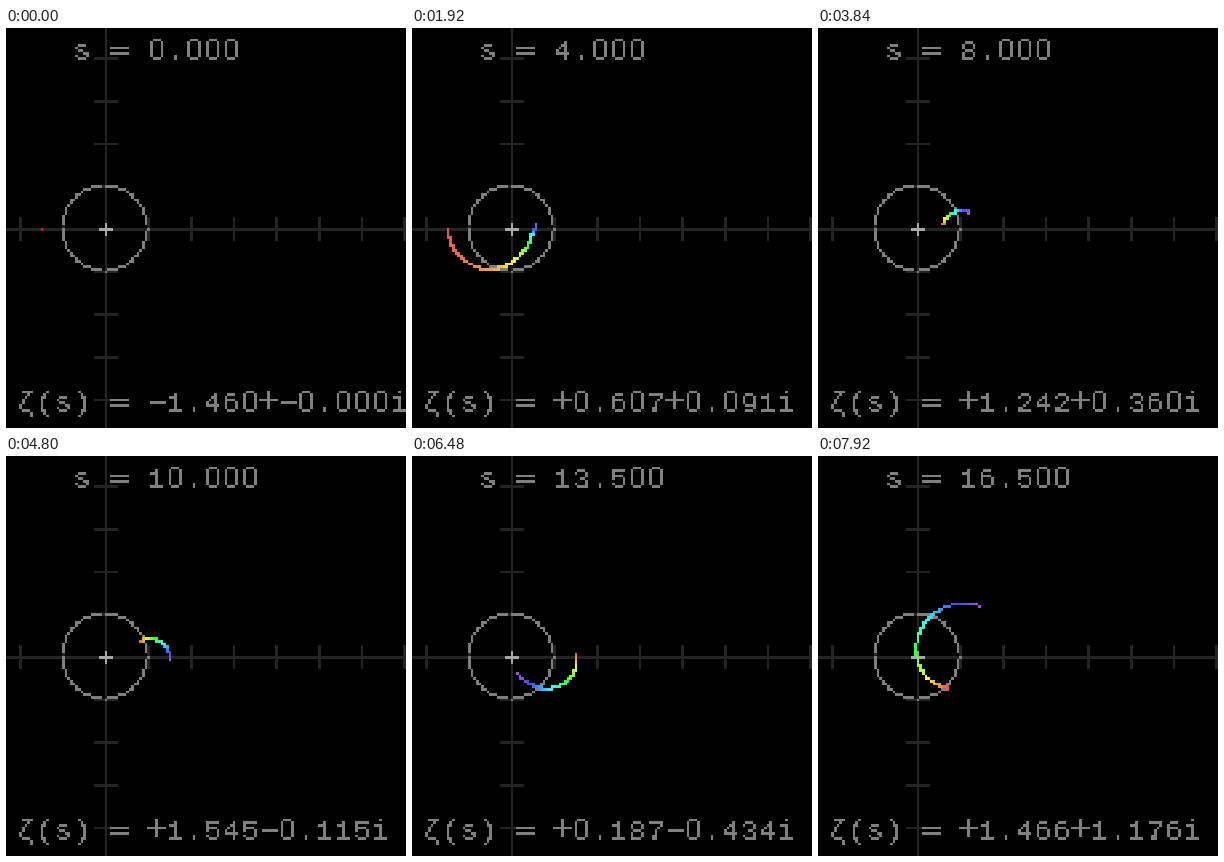
Animation of 400x400 px, one loop 8000 ms. Source, as an HTML page with a canvas:

```html
<!DOCTYPE html>
<html lang="en">
<head>
<meta charset="utf-8">
<title>Zeta on the critical line</title>
<style>
  html, body { margin: 0; width: 100%; height: 100%; overflow: hidden; background: #000; }
  canvas { display: block; width: 100vw; height: 100vh; image-rendering: pixelated; }
</style>
</head>
<body>
<canvas id="stage" width="150" height="150"></canvas>
<script>
const SIZE = 150, UNIT = 16, ORIGIN_X = 37, ORIGIN_Y = 75;
const STEP_MS = 240, LOOP_MS = 8000, STEP_T = 0.5, TRAIL_T = 4;
const CELL = 7, FONT_SIZE = 11.67;

const ctx = document.getElementById('stage').getContext('2d');
const textLayer = document.createElement('canvas');
textLayer.width = textLayer.height = SIZE;
const textCtx = textLayer.getContext('2d', { willReadFrequently: true });

// Weights of the accelerated alternating series (Borwein).
const TERMS = 30;
const weights = (() => {
  const sums = [];
  let term = 1, sum = 0;
  for (let i = 0; i <= TERMS; i++) {
    sums.push(sum += term);
    term *= 4 * (TERMS + i) * (TERMS - i) / ((2 * i + 1) * (2 * i + 2));
  }
  return sums.slice(0, TERMS).map((d, k) => (k % 2 ? -1 : 1) * (1 - d / sum));
})();

// zeta(1/2 + it)
function zeta(t) {
  let a = 0, b = 0;
  weights.forEach((w, k) => {
    const r = w / Math.sqrt(k + 1), angle = t * Math.log(k + 1);
    a += r * Math.cos(angle);
    b -= r * Math.sin(angle);
  });
  const c = 1 - Math.SQRT2 * Math.cos(t * Math.LN2);
  const d = Math.SQRT2 * Math.sin(t * Math.LN2);
  const norm = c * c + d * d;
  return { re: (a * c + b * d) / norm, im: (b * c - a * d) / norm };
}

function rect(color, x, y, w, h) {
  ctx.fillStyle = color;
  ctx.fillRect(x, y, w, h);
}

function plot(color, re, im) {
  rect(color, Math.floor(ORIGIN_X + UNIT * re), Math.floor(ORIGIN_Y - UNIT * im), 1, 1);
}

function drawPlane() {
  const dim = '#242424', gray = '#808080', bright = '#a8a8a8';
  rect('#000', 0, 0, SIZE, SIZE);
  rect(dim, 0, ORIGIN_Y, SIZE, 1);
  rect(dim, ORIGIN_X, 0, 1, SIZE);
  for (let n = -4; n <= 7; n++) {
    if (n === 0) continue;
    rect(dim, ORIGIN_X + n * UNIT, ORIGIN_Y - 4, 1, 9);
    rect(dim, ORIGIN_X - 4, ORIGIN_Y + n * UNIT, 9, 1);
  }
  // About one dot per pixel of circumference keeps the outline thin.
  const dots = 100;
  for (let i = 0; i < dots; i++) {
    const angle = i / dots * 2 * Math.PI;
    plot(gray, Math.cos(angle), Math.sin(angle));
  }
  rect(bright, ORIGIN_X - 2, ORIGIN_Y, 5, 1);
  rect(bright, ORIGIN_X, ORIGIN_Y - 2, 1, 5);
}

// An undotted zero and wide operators, the rest in the base face.
function familyFor(char) {
  if (char === '0') return '"Liberation Sans", sans-serif';
  if ('=+−'.includes(char)) return '"DejaVu Sans Mono", monospace';
  return '"Liberation Mono", monospace';
}

function write(text, x, baseline) {
  textCtx.textAlign = 'center';
  textCtx.fillStyle = '#808080';
  [...text].forEach((char, i) => {
    textCtx.font = `${FONT_SIZE}px ${familyFor(char)}`;
    textCtx.fillText(char, x + (i + 0.5) * CELL, baseline);
  });
}

// Turns antialiased glyphs into solid pixels.
function stampText() {
  const image = textCtx.getImageData(0, 0, SIZE, SIZE), px = image.data;
  for (let i = 0; i < px.length; i += 4) {
    px[i] = px[i + 1] = px[i + 2] = 128;
    px[i + 3] = px[i + 3] > 108 ? 255 : 0;
  }
  textCtx.putImageData(image, 0, 0);
  ctx.drawImage(textLayer, 0, 0);
}

const signed = v => (v >= 0 ? '+' : '−') + Math.abs(v).toFixed(3);

function drawLabels(t) {
  const { re, im } = zeta(t);
  textCtx.clearRect(0, 0, SIZE, SIZE);
  write(`s = ${t.toFixed(3)}`, 25, 12);
  write(`ζ(s) = ${signed(re)}${t === 0 ? '+−0.000' : signed(im)}i`, 4, 144);
  stampText();
}

function drawTrail(t) {
  const start = Math.max(0, t - TRAIL_T), samples = 320;
  if (t === 0) {
    const { re, im } = zeta(0);
    plot('hsl(345 100% 50%)', re, im);
    return;
  }
  for (let i = 0; i <= samples; i++) {
    const f = i / samples, { re, im } = zeta(start + (t - start) * f);
    const saturation = 100 - 25 * (2 * f - 1) ** 2;
    plot(`hsl(${270 * f} ${saturation}% 61%)`, re, im);
  }
}

let shown = -1;
function tick(now) {
  const step = Math.floor(now % LOOP_MS / STEP_MS);
  if (step !== shown) {
    shown = step;
    const t = step * STEP_T;
    drawPlane();
    drawLabels(t);
    drawTrail(t);
  }
  requestAnimationFrame(tick);
}
tick(0);
</script>
</body>
</html>
```
